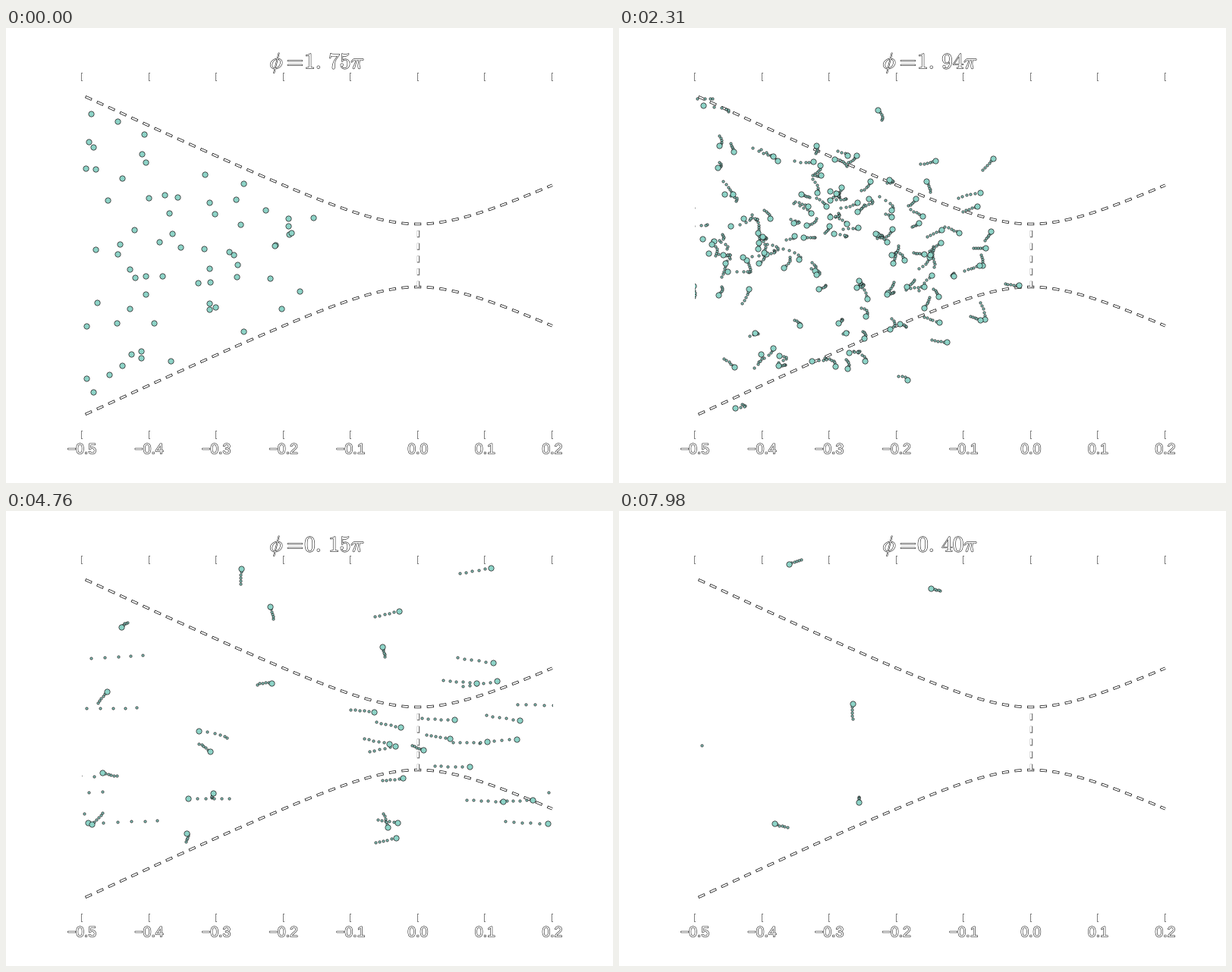
A matplotlib script for the animation above (8000 ms loop, 800 by 600 pixels).

```python
import numpy as np
import matplotlib.pyplot as plt
from matplotlib.animation import FuncAnimation
from matplotlib.patches import Rectangle
from matplotlib.patheffects import withStroke

plt.rcParams["mathtext.fontset"] = "cm"
plt.rcParams["lines.scale_dashes"] = False

STEPS, LOOP_MS = 115, 8000
LEFT, RIGHT, TOP, BOTTOM = 100, 720, 60, 540
UNIT = (RIGHT - LEFT) / 0.7          # pixels per axis unit
CX, CY = LEFT + 0.5 * UNIT, 300
WAIST, RANGE = 41.5, 0.1 * UNIT
TRAIL = 5
INK, GREY, TEAL = "#1c1c1c", "#7a7a7a", "#8dd3c7"

CLOUD, ENTRANTS = 69, 65             # on stage at the start, arriving later
SPLIT = 380                          # released left or right of here


def beam(x):
    return WAIST * np.hypot(1, (x - CX) / RANGE)


def ramp(t):
    t = np.clip(t, 0, 1)
    return t * t * (3 - 2 * t)


def simulate():
    """Particles stream in, wander, then get released and carried outwards."""
    rng = np.random.default_rng(7)
    n = CLOUD + ENTRANTS
    late = np.arange(n) >= CLOUD
    birth = np.where(late, rng.uniform(0, 22, n), 0)
    x = np.where(late, LEFT - 8, LEFT + 370 * rng.beta(1, 2.3, n))
    side = np.where(rng.random(n) < np.where(late, 0.7, 0.52), -1, 1)
    y = CY + side * rng.uniform(0, 0.95, n) * beam(x)

    inflow = rng.uniform(0.2, 1.1, n)
    speed = rng.normal(3, 0.9, n)
    angle = rng.uniform(0, 2 * np.pi, n)
    turn = rng.normal(0, 0.06, n)
    wait = np.where(rng.random(n) < 0.72, 6, 45)
    release = 26 + rng.exponential(wait)
    leftward = x < SPLIT

    track = []
    for k in range(STEPS):
        track.append(np.column_stack([x, y]))
        leftward = np.where(k < release, x < SPLIT, leftward)
        out = ramp((k - release) / 8)
        away = np.where(leftward, 0.045 * (x - 540), 6.5 + 0.02 * (x - 500))
        push = (1 - ramp((k - 24) / 9)) * inflow * 0.033 * (530 - x)
        squeeze = (y - CY) * (x - CX) / ((x - CX) ** 2 + RANGE ** 2)
        drift = speed * (1 - 0.6 * out)
        heading = angle + turn * k
        born = k >= birth
        x = x + born * (push + out * away + drift * np.cos(heading))
        y = y + born * (push * squeeze + drift * np.sin(heading))
    return track


track = simulate()

fig = plt.figure(figsize=(8, 6), dpi=100, facecolor="white")
ax = fig.add_axes([0, 0, 1, 1])
ax.set(xlim=(0, 800), ylim=(600, 0))
ax.axis("off")


def dashed(x, y, phase, color=INK):
    ax.plot(x, y, color=color, lw=2.5, ls=(phase + 0.3, (6.6, 5.4)))
    ax.plot(x, y, color="white", lw=1.4, ls=((phase - 0.3) % 12, (5.4, 6.6)))


def outlined(x, y, text, size, **kw):
    return ax.text(x, y, text, size=size, color="white", ha="center",
                   va="baseline",
                   path_effects=[withStroke(linewidth=0.8, foreground=INK)],
                   **kw)


xs = np.linspace(LEFT, RIGHT, 400)
dashed(xs, CY - beam(xs), 8)
dashed(xs, CY + beam(xs), 8)
dashed([CX, CX], [CY + WAIST, CY - WAIST], 0, GREY)

for i in range(-5, 3):
    x = CX + i * UNIT / 10
    for y in (TOP, BOTTOM - 8):
        ax.plot([x, x], [y, y + 8.5], color=GREY, lw=1.5)
        ax.plot([x, x], [y, y + 8], color="white", lw=0.8)
    outlined(x, 561.5, f"{i / 10:.1f}".replace("-", "\u2212"), 14,
             family="Liberation Sans")

title = outlined(410, 53.5, "", 21)


def dots(size):
    line, = ax.plot([], [], "o", ms=size, color=TEAL, mec=INK, mew=0.5)
    line.set_clip_path(Rectangle((LEFT, TOP), RIGHT - LEFT, BOTTOM - TOP,
                                 transform=ax.transData))
    return line


tails, heads = dots(2.3), dots(5.2)


def update(k):
    # The phase advances more slowly towards the end
    phase = np.interp(k, [0, 84, 114], [1.7455, 2.2465, 2.4]) % 2
    title.set_text(rf"$\phi=\!{phase:.2f}\pi$".replace(".", r".\,"))
    heads.set_data(*track[k].T)
    past = track[max(0, k - TRAIL):k]
    tails.set_data(*(np.vstack(past).T if past else ([], [])))
    return tails, heads, title


def init():
    return update(0)


anim = FuncAnimation(fig, update, frames=STEPS, init_func=init,
                     interval=LOOP_MS / STEPS, repeat=True, repeat_delay=0)
plt.show()
```
